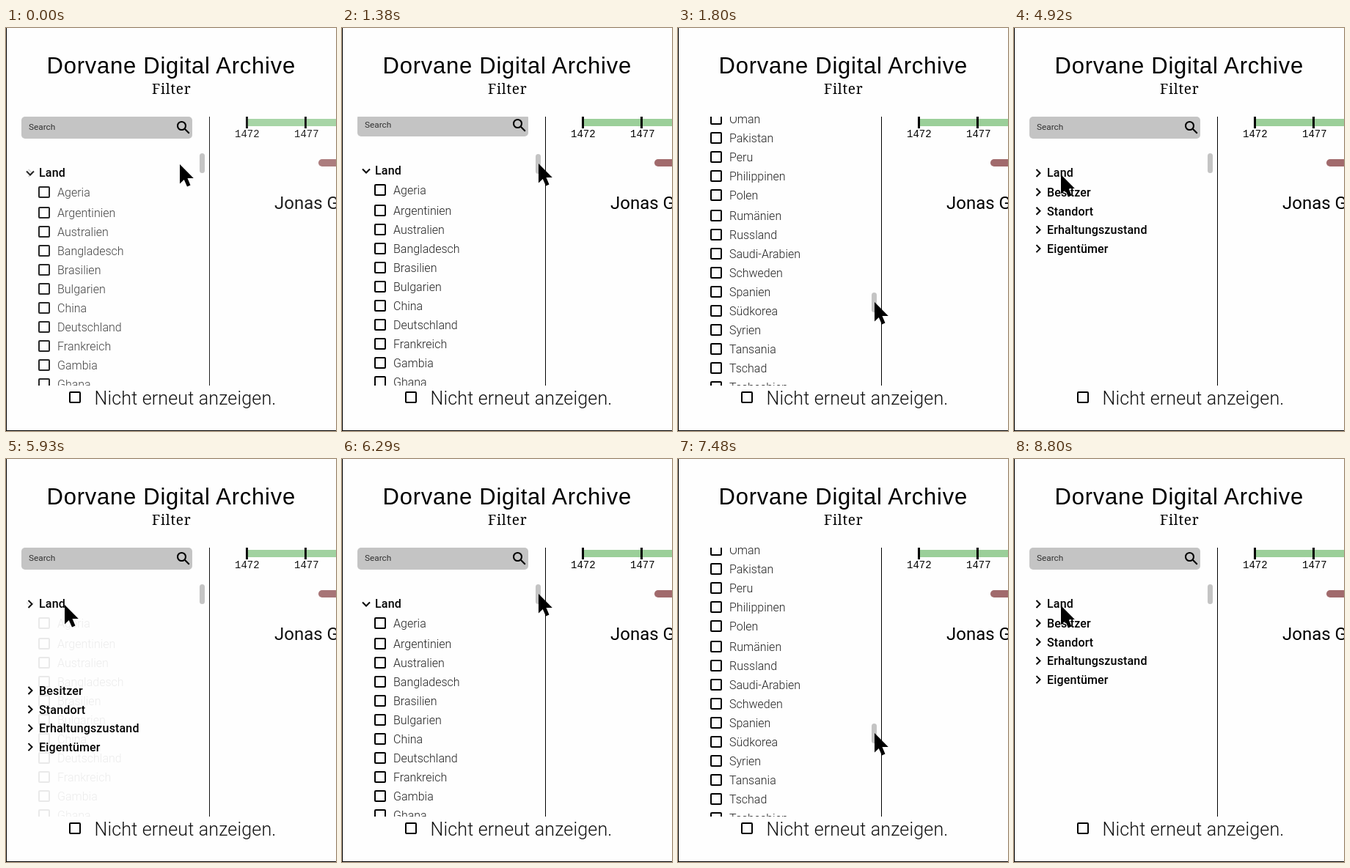
Animation of 450 by 550 pixels, one loop 9.75 s. Source, as an HTML page:

```html
<!DOCTYPE html>
<html lang="de">
<head>
<meta charset="utf-8">
<title>Filter</title>
<style>
  html, body { margin: 0; width: 100%; height: 100%; overflow: hidden; background: #fefefe; }
  svg { display: block; width: 100vw; height: 100vh; }
  text { font-family: Roboto, "Open Sans", sans-serif; white-space: pre; }
  .title { font: 31px "Liberation Sans", Arial, sans-serif; letter-spacing: .75px; }
  .subtitle { font: 19px "Noto Serif", serif; letter-spacing: .75px; }
  .item { font-size: 16px; font-weight: 300; fill: #222; }
  .head { font-size: 16px; font-weight: 500; letter-spacing: .16px; }
  .year { font: 14px "Liberation Mono", monospace; }
  .notice { font-size: 25px; font-weight: 300; letter-spacing: .17px; fill: #111; }
  .box, .chevron { fill: none; stroke: #000; stroke-width: 2; }
</style>
</head>
<body>
<svg viewBox="0 0 450 550">
  <defs>
    <clipPath id="panel"><rect x="0" y="121" width="277" height="367"/></clipPath>
  </defs>
  <rect width="450" height="550" fill="#fefefe"/>
  <text class="title" x="55.5" y="62">Dorvane Digital Archive</text>
  <text class="subtitle" x="199" y="89.5">Filter</text>

  <g id="timeline">
    <rect x="277" y="121" width="1" height="367"/>
    <rect x="328" y="124" width="122" height="10" fill="#9bcf99"/>
    <rect x="327" y="121" width="3" height="16"/>
    <rect x="407" y="121" width="3" height="16"/>
    <text class="year" x="312" y="149">1472</text>
    <text class="year" x="393" y="149">1477</text>
    <rect x="426" y="179" width="60" height="10" rx="5" fill="#a16a6c"/>
    <text x="366" y="247" font-size="24">Jonas G</text>
  </g>

  <g clip-path="url(#panel)">
    <g id="content">
      <rect x="21" y="121" width="233" height="30" rx="5" fill="#c4c4c4"/>
      <text x="31" y="139" font-size="11.8" fill="#333">Search</text>
      <g fill="none" stroke="#000" stroke-width="2.1">
        <circle cx="239.5" cy="133.5" r="5.5"/>
        <path d="M243.6 137.6l6.2 6.2"/>
      </g>
      <text class="head" x="45" y="203">Land</text>
      <path id="closedMark" class="chevron" d="M30.5 193l5 5-5 5"/>
      <path id="openMark" class="chevron" d="M28 195.500l5 5 5-5"/>
      <g id="countries"></g>
      <g id="groups"></g>
    </g>
    <rect id="thumb" x="264" y="171" width="7" height="27" rx="3.5" fill="#c4c4c4"/>
  </g>

  <rect class="box" x="87" y="497" width="14" height="14" rx="1"/>
  <text class="notice" x="120.5" y="513.5">Nicht erneut anzeigen.</text>
  <rect width="1" height="550"/>
  <rect y="549" width="450" height="1"/>
  <path id="cursor" d="M0 0V26.500L5.800 21 10 30.500 14.500 28.500 10.500 19H18.800Z"/>
</svg>
<script>
const LOOP = 9750, STEP = 60, EASE_MS = 450;
const SCROLL = 780, THUMB_TRAVEL = 190, LIST_HEIGHT = 1180;
const $ = id => document.getElementById(id);

const countries = `Ageria Argentinien Australien Bangladesch Brasilien Bulgarien China
  Deutschland Frankreich Gambia Ghana Guatemala Indien Indonesien Iran Italien Japan
  Jemen Kasachstan Kolumbien Kuba Malaysia Marokko Mexiko Nepal Nigeria Oman Pakistan
  Peru Philippinen Polen Rumänien Russland Saudi-Arabien Schweden Spanien Südkorea
  Syrien Tansania Tschad Tschechien Türkei Ungarn Vietnam`.split(/\s+/);
const wideGaps = ["Argentinien", "Jemen", "Rumänien"];

let rowY = 198;
$("countries").innerHTML = countries.map(name => {
  rowY += wideGaps.includes(name) ? 28 : 26;
  return `<rect class="box" x="45" y="${rowY - 7}" width="14" height="14" rx="1"/>
    <text class="item" x="70" y="${rowY + 6}">${name}</text>`;
}).join("");

$("groups").innerHTML = ["Besitzer", "Standort", "Erhaltungszustand", "Eigentümer"].map((name, i) => {
  const y = 224 + i * 25.7;
  return `<path class="chevron" d="M30.500 ${y - 5}l5 5-5 5"/>
    <text class="head" x="45" y="${y + 6}">${name}</text>`;
}).join("");

// Ease-in-out, cubic-bezier(.42, 0, .58, 1)
function ease(x) {
  if (x <= 0) return 0;
  if (x >= 1) return 1;
  let lo = 0, hi = 1;
  for (let i = 0; i < 24; i++) {
    const s = (lo + hi) / 2, r = 1 - s;
    if (1.26 * s * r * r + 1.74 * s * s * r + s * s * s < x) lo = s; else hi = s;
  }
  return lo * lo * (3 - 2 * lo);
}

// Progress moves in steps, as the picture refreshes every 60 ms
function progress(t, start, end, lead) {
  if (t < start) return 0;
  if (t >= end) return 1;
  return ease((lead + Math.floor((t - start) / STEP) * STEP) / EASE_MS);
}

function stateAt(t) {
  if (t < 120) return { open: progress(t + 6170, 5870, 6290, 28), scroll: 0 };
  if (t < 4920) return { open: 1, scroll: progress(t, 1380, 1800, 20) };
  if (t < 8800) return { open: progress(t, 5870, 6290, 28), scroll: progress(t, 7070, 7480, 7.8) };
  return { open: 0, scroll: 0 };
}

// Positions snap to whole pixels to keep thin lines crisp
const move = (id, x, y) =>
  $(id).setAttribute("transform", `translate(${Math.round(x)} ${Math.round(y)})`);
const fade = (id, a) => $(id).setAttribute("opacity", a);
const dip = p => 1 - p * (1 - p);

function draw(t) {
  const { open, scroll } = stateAt(t);
  move("content", 0, -SCROLL * scroll);
  move("thumb", 0, THUMB_TRAVEL * scroll);
  move("groups", 0, LIST_HEIGHT * open);
  move("cursor", 64 + 204 * open, 200 - 16 * open + THUMB_TRAVEL * scroll);
  fade("countries", open);
  fade("openMark", open);
  fade("closedMark", 1 - open);
  fade("timeline", dip(open) * dip(scroll));
}

const begin = performance.now();
function tick() {
  draw((performance.now() - begin) % LOOP);
  requestAnimationFrame(tick);
}
tick();
</script>
</body>
</html>
```
